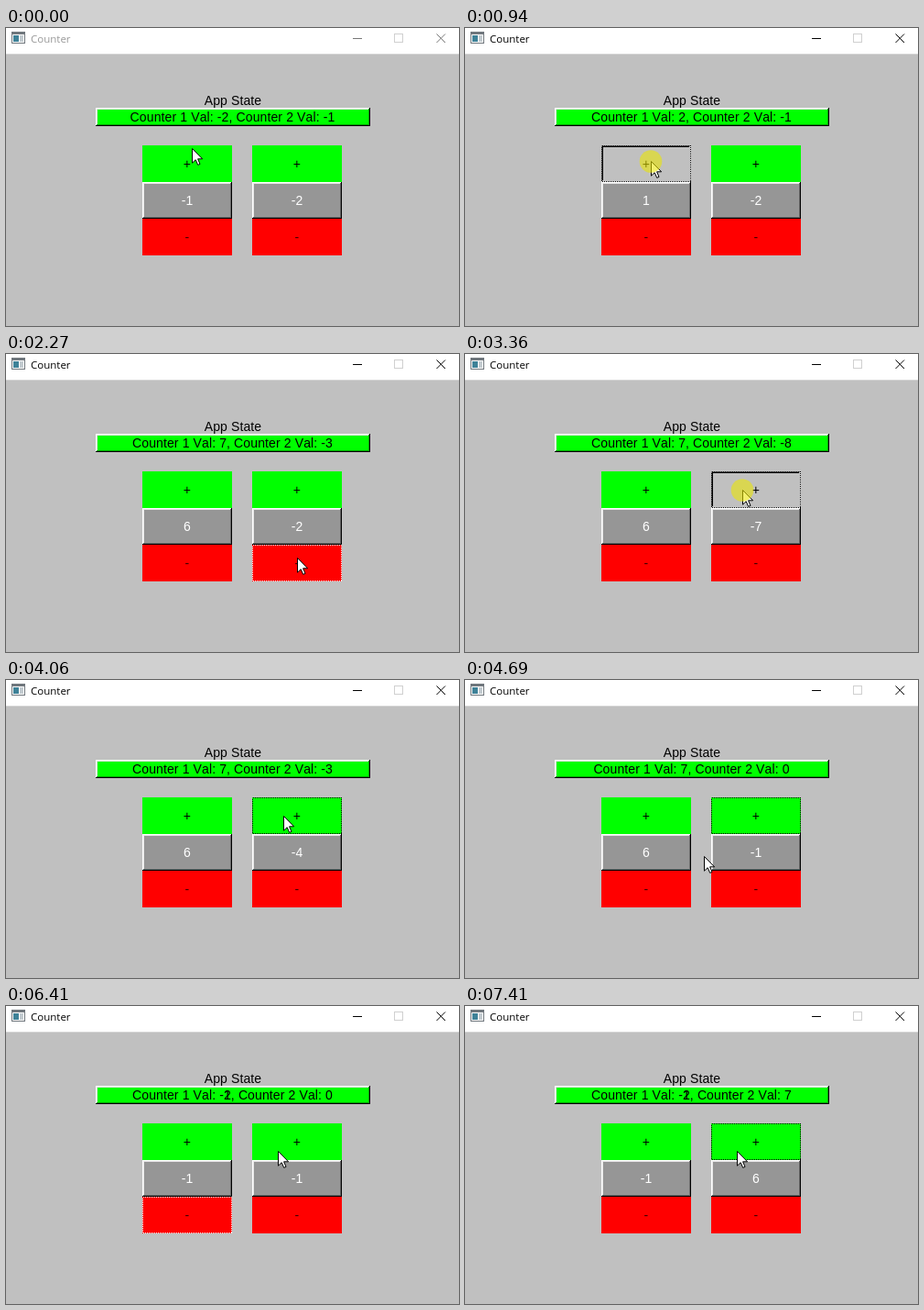
Write an HTML page that moves like this. It is 495x325 px and loops after 7.57 s.

```html
<!DOCTYPE html>
<html lang="en">
<head>
<meta charset="utf-8">
<title>Counter</title>
<style>
  html, body { margin: 0; width: 100%; height: 100%; overflow: hidden; background: #c0c0c0; }
  svg { display: block; width: 495px; height: 325px; }
  text { font: 14px "Liberation Sans", Arial, sans-serif; letter-spacing: .12px; font-kerning: none; text-anchor: middle; white-space: pre; }
  .caption { font: 11.5px "Open Sans", "Noto Sans", sans-serif; letter-spacing: 0; text-anchor: start; }
  .crisp { shape-rendering: crispEdges; }
  .line { fill: none; stroke-width: 1; }
</style>
</head>
<body>
<svg id="stage" viewBox="0 0 495 325" xmlns="http://www.w3.org/2000/svg">
  <rect width="495" height="325" fill="#c0c0c0"/>
  <rect width="495" height="28" fill="#fff"/>
  <path class="line crisp" d="M0 28.5H495" stroke="#d4d4d4"/>
  <g class="crisp">
    <rect x="6" y="4" width="15" height="13" fill="#70777d"/>
    <rect x="7" y="7" width="13" height="9" fill="#fff"/>
    <rect x="8" y="8" width="6" height="7" fill="#3f8298"/>
    <rect x="15" y="8" width="4" height="7" fill="#c3cbd0"/>
  </g>
  <text id="caption" class="caption" x="27" y="16">Counter</text>
  <g id="controls" class="line">
    <path class="crisp" d="M379 11.5H389"/>
    <path d="M470.5 6.5L480 16M480 6.5L470.5 16"/>
  </g>
  <rect class="line crisp" x="424.5" y="6.5" width="9" height="9" stroke="#d0d0d0"/>
  <text x="248" y="84">App State</text>
  <g id="widgets"></g>
  <g id="pointer">
    <path d="M.5 .5V16.2L4.2 12.7L6.7 18.4L9 17.4L6.6 11.8H11.6Z" fill="#fff" stroke="#000"/>
    <circle id="halo" r="12.3" cy=".5" fill="#ebe600" fill-opacity=".58"/>
  </g>
</svg>
<script>
const LOOP = 7570;
const $ = id => document.getElementById(id);
const widgets = $('widgets');

function add(tag, attrs, parent = widgets) {
  const el = document.createElementNS('http://www.w3.org/2000/svg', tag);
  for (const key in attrs) el.setAttribute(key, attrs[key]);
  return parent.appendChild(el);
}

function raisedBox(x, y, w, h, fill, shade) {
  add('rect', { x, y, width: w, height: h, fill, class: 'crisp' });
  const edge = (d, stroke) => add('path', { d, stroke, class: 'line crisp' });
  edge(`M${x + 1} ${y + h - 1.5}H${x + w - 1.5}V${y + 1}`, shade);
  edge(`M${x + .5} ${y + h - 1}V${y + .5}H${x + w - 1}`, '#fff');
  edge(`M${x + 1.5} ${y + h - 2}V${y + 1.5}H${x + w - 2}`, '#e4e4e4');
  edge(`M${x} ${y + h - .5}H${x + w - .5}V${y}`, '#000');
}

function makeButton(counter, step) {
  const x = 149 + counter * 120, y = step > 0 ? 128 : 208;
  const color = step > 0 ? '#0f0' : '#f00';
  const face = add('rect', { x, y, width: 98, height: 40, class: 'crisp' });
  const sunk = add('g', { class: 'line crisp' });
  add('path', { d: `M${x + .5} ${y + 39}V${y + .5}H${x + 97}`, stroke: '#777' }, sunk);
  add('path', { d: `M${x} ${y + 39.5}H${x + 97.5}V${y}`, stroke: '#eee' }, sunk);
  add('path', { d: `M${x + 1.5} ${y + 38}V${y + 1.5}H${x + 96}`, stroke: '#000' }, sunk);
  const focus = add('rect', {
    x: x + .5, y: y + .5, width: 97, height: 39, class: 'line crisp', 'stroke-dasharray': '1 1'
  });
  add('text', { x: x + 49, y: y + 25, fill: step > 0 ? '#000' : '#400' })
    .textContent = step > 0 ? '+' : '-';
  return {
    counter, step,
    contains: ([px, py]) => px >= x && px < x + 98 && py >= y && py < y + 40,
    draw(focused, pressed) {
      face.setAttribute('fill', pressed ? '#c0c0c0' : color);
      sunk.style.display = pressed ? '' : 'none';
      focus.style.display = focused ? '' : 'none';
      focus.setAttribute('stroke', step > 0 || pressed ? '#000' : '#fff');
    }
  };
}

raisedBox(98, 87, 300, 20, '#0f0', '#00a000');
const status = add('text', { x: 247.5, y: 102 });
const residue = add('text', { x: 247.5, y: 102, fill: 'none' });
const buttons = [], readouts = [];
for (const counter of [0, 1]) {
  const x = 149 + counter * 120;
  buttons.push(makeButton(counter, 1), makeButton(counter, -1));
  raisedBox(x, 168, 98, 40, '#969696', '#696969');
  readouts.push(add('text', { x: x + 49, y: 193, fill: '#fff' }));
}

const path = [
  [203, 137], [203, 143], [203, 145],
  [232, 174], [296, 222], [367, 240], [318, 222],
  [303, 148],
  [261, 192], [203, 235],
  [250, 196], [297, 158]
];

// m: move, p: press, r: release, c: a whole click within one step
const script = [
  [170, 850, 'm m mp r p r p r p r'],
  [940, 1660, 'p r p r p r p r p r'],
  [1730, 2420, 'm m m m p r p r p r'],
  [2570, 3130, 'p r p r p r p r'],
  [3360, 3360, 'mp'],
  [3510, 3890, 'r p r c p r'],
  [4060, 4450, 'c p r c p r'],
  [4690, 5390, 'm m p r p r p r p r'],
  [5460, 5610, 'p r p'],
  [5780, 6480, 'r p r p r p r m m p'],
  [6560, 6710, 'r p r'],
  [6880, 6880, 'c'],
  [7030, 7410, 'c p r p r c']
];

function buildTimeline() {
  let state = {
    time: 0, at: [203, 131], values: [-2, -1], shown: [-1, -2],
    focus: null, pressed: false, active: false, residue: false
  };
  const states = [state];
  let stop = 0;

  const press = () => {
    state.focus = buttons.find(b => b.contains(state.at));
    state.pressed = state.active = true;
  };
  // Readouts keep the value from before the click; the status shows the new one.
  const release = () => {
    const { counter, step } = state.focus;
    state.shown[counter] = state.values[counter];
    state.values[counter] += step;
    state.pressed = false;
    if (counter === 0) state.residue = step < 0 && state.values[0] === -2;
  };
  const actions = {
    m: () => { state.at = path[stop++]; },
    p: press,
    r: release,
    c: () => { press(); release(); }
  };

  for (const [from, to, steps] of script) {
    const list = steps.split(' ');
    list.forEach((step, i) => {
      const time = Math.round((from + (to - from) * i / Math.max(1, list.length - 1)) / 10) * 10;
      state = { ...state, time, values: [...state.values], shown: [...state.shown] };
      for (const action of step) actions[action]();
      states.push(state);
    });
  }
  return states;
}

const timeline = buildTimeline();

function draw(time) {
  const s = timeline.findLast(state => state.time <= time);
  $('caption').setAttribute('fill', s.active ? '#000' : '#999');
  $('controls').setAttribute('stroke', s.active ? '#000' : '#777');
  status.textContent = `Counter 1 Val: ${s.values[0]}, Counter 2 Val: ${s.values[1]}`;
  residue.innerHTML = s.residue
    ? `Counter 1 Val: -<tspan fill="#000">1</tspan>, Counter 2 Val: ${s.values[1]}` : '';
  readouts.forEach((el, i) => { el.textContent = s.shown[i]; });
  buttons.forEach(b => b.draw(b === s.focus, b === s.focus && s.pressed));
  $('pointer').setAttribute('transform', `translate(${s.at})`);
  $('halo').style.display = s.pressed ? '' : 'none';
}

function tick() {
  draw(performance.now() % LOOP);
  requestAnimationFrame(tick);
}
tick();
</script>
</body>
</html>
```
